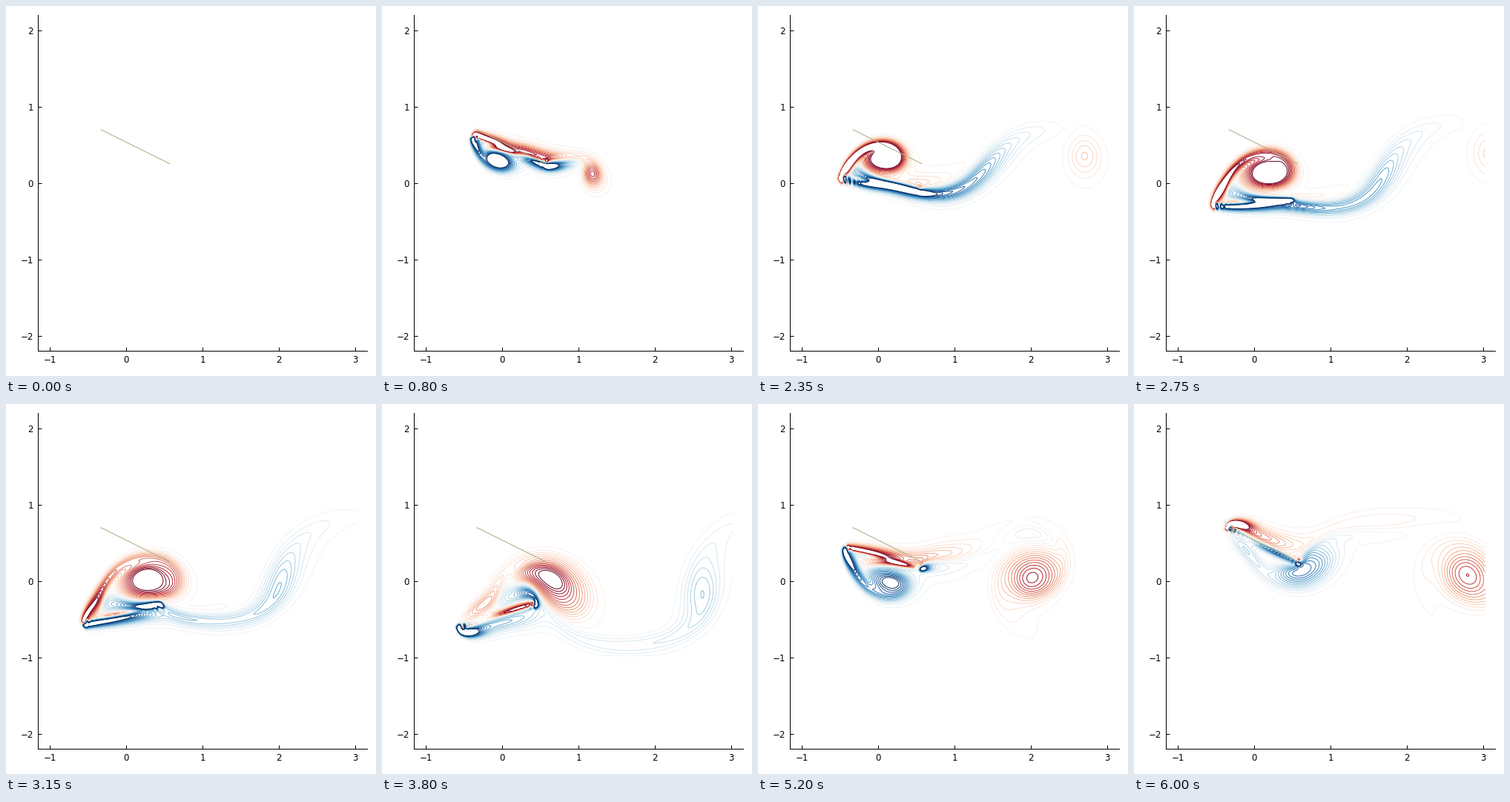
Write a matplotlib script that moves like this. It is 499x499 px and loops after 6.05 s.

```python
import numpy as np
import matplotlib.pyplot as plt
from matplotlib.animation import FuncAnimation

# Viscous flow past a heaving and pitching flat plate (vorticity form).
FRAMES, INTERVAL = 121, 50
SUB = 4
DT = 0.05 / SUB
H, NU = 0.02, 1 / 200
OMEGA = 4 / 3
x = -1.01 + H * np.arange(203)
y = -0.99 + H * np.arange(100)

# Free-space Biot-Savart kernels on a doubled grid
PAD = (200, 405)
ky = np.fft.fftfreq(PAD[0], 1 / PAD[0])[:, None] * H
kx = np.fft.fftfreq(PAD[1], 1 / PAD[1])[None, :] * H
r2 = kx**2 + ky**2
r2[0, 0] = 1
KU = np.fft.rfft2(-ky / (2 * np.pi * r2)) * H**2
KV = np.fft.rfft2(kx / (2 * np.pi * r2)) * H**2

# Plate points and their mutual response to tangential / normal impulses
arc = np.linspace(-0.5, 0.5, 34)
EPS = 0.9 * H
S2 = 2 * EPS**2
d2 = (arc[:, None] - arc[None, :])**2 + 1e-12
blob = np.exp(-d2 / (2 * S2))
tang = (1 - blob) / (2 * np.pi * d2)
np.fill_diagonal(tang, 1 / (4 * np.pi * S2))
norm = blob / (2 * np.pi * S2) - tang
damp = 0.005 / (4 * np.pi * S2) * np.eye(arc.size)
INV_T = np.linalg.inv(tang + damp)
INV_N = np.linalg.inv(norm + damp)


def plate(t):
    s, c = np.sin(OMEGA * t), np.cos(OMEGA * t)
    a = np.radians(-4.15 - 21.4 * s + 3.8 * c)
    px = 0.027 + 0.092 * s - 0.01 * c + arc * np.cos(a)
    py = -0.0075 + 0.491 * s + 0.014 * c + arc * np.sin(a)
    return px, py, a


def velocity(w):
    f = np.fft.rfft2(w, PAD)
    u = np.fft.irfft2(f * KU, PAD)[:y.size, :x.size] + 1
    v = np.fft.irfft2(f * KV, PAD)[:y.size, :x.size]
    return u, v


def enforce(w, u, v, t):
    """Add the vorticity that cancels the slip on the plate."""
    px, py, a = plate(t)
    (x1, y1, _), (x0, y0, _) = plate(t + 1e-4), plate(t - 1e-4)
    dx, dy = x - px[:, None], y - py[:, None]
    wx, wy = np.exp(-dx**2 / (2 * EPS**2)), np.exp(-dy**2 / (2 * EPS**2))
    amp = 1 / (2 * np.pi * EPS**2)
    su = (x1 - x0) / 2e-4 - amp * H**2 * ((wy @ u) * wx).sum(1)
    sv = (y1 - y0) / 2e-4 - amp * H**2 * ((wy @ v) * wx).sum(1)
    c, s = np.cos(a), np.sin(a)
    ft, fn = INV_T @ (c * su + s * sv), INV_N @ (c * sv - s * su)
    fx, fy = c * ft - s * fn, s * ft + c * fn
    grad = amp / EPS**2
    w += grad * (wy * dy * fx[:, None]).T @ wx
    w -= grad * (wy * fy[:, None]).T @ (wx * dx)


def rate(w, u, v):
    out = np.zeros_like(w)
    e, o = w[1:-1, 2:], w[1:-1, :-2]
    n, s = w[2:, 1:-1], w[:-2, 1:-1]
    out[1:-1, 1:-1] = (NU / H**2 * (e + o + n + s - 4 * w[1:-1, 1:-1])
                       - (u[1:-1, 1:-1] * (e - o) + v[1:-1, 1:-1] * (n - s)) / (2 * H))
    return out


def simulate():
    w = np.zeros((y.size, x.size))
    history = [w.copy()]
    for _ in range(3):
        enforce(w, *velocity(w), 0)
    old = velocity(w)
    for step in range(1, (FRAMES - 1) * SUB + 1):
        for _ in range(2):
            u, v = velocity(w)
            enforce(w, u, v, step * DT)
        um, vm = 1.5 * u - 0.5 * old[0], 1.5 * v - 0.5 * old[1]
        old = u, v
        k = w + DT / 3 * rate(w, um, vm)
        k = w + DT / 2 * rate(k, um, vm)
        w = w + DT * rate(k, um, vm)
        w[:, -1] = w[:, -2]
        if step % SUB == 0:
            history.append(w.copy())
    return history


flow = simulate()

SIZE = 499
UNIT, X0, Y0 = 103, 162.1, 238.8
fig = plt.figure(figsize=(SIZE / 100, SIZE / 100), dpi=100, facecolor="white")
left, right, top, bottom = 43.1, 487, 12, 465
ax = fig.add_axes([left / SIZE, 1 - bottom / SIZE,
                   (right - left) / SIZE, (bottom - top) / SIZE])
ax.set_xlim((left - X0) / UNIT, (right - X0) / UNIT)
ax.set_ylim((Y0 - bottom) / UNIT, (Y0 - top) / UNIT)
ax.set_xticks(range(-1, 4))
ax.set_yticks(range(-2, 3))
ax.spines[["top", "right"]].set_visible(False)
for side in ("left", "bottom"):
    ax.spines[side].set_linewidth(0.72)
ax.tick_params(direction="in", length=3.6, width=0.72, labelsize=8.5,
               labelfontfamily="DejaVu Sans")
ax.tick_params(axis="x", pad=4.3)
ax.tick_params(axis="y", pad=4.5)
ax.plot([-0.33, 0.567], [0.699, 0.255], color="#b3b38c", lw=0.8, zorder=5)

levels = np.linspace(-10, 10, 30)
lines = []


def draw(k):
    while lines:
        lines.pop().remove()
    if k:
        lines.append(ax.contour(x, y, flow[k], levels, cmap="RdBu",
                                vmin=-10, vmax=10, linewidths=0.7))
    return lines


anim = FuncAnimation(fig, draw, frames=FRAMES, init_func=lambda: draw(0),
                     interval=INTERVAL, repeat=True, repeat_delay=0, blit=False)
plt.show()
```
